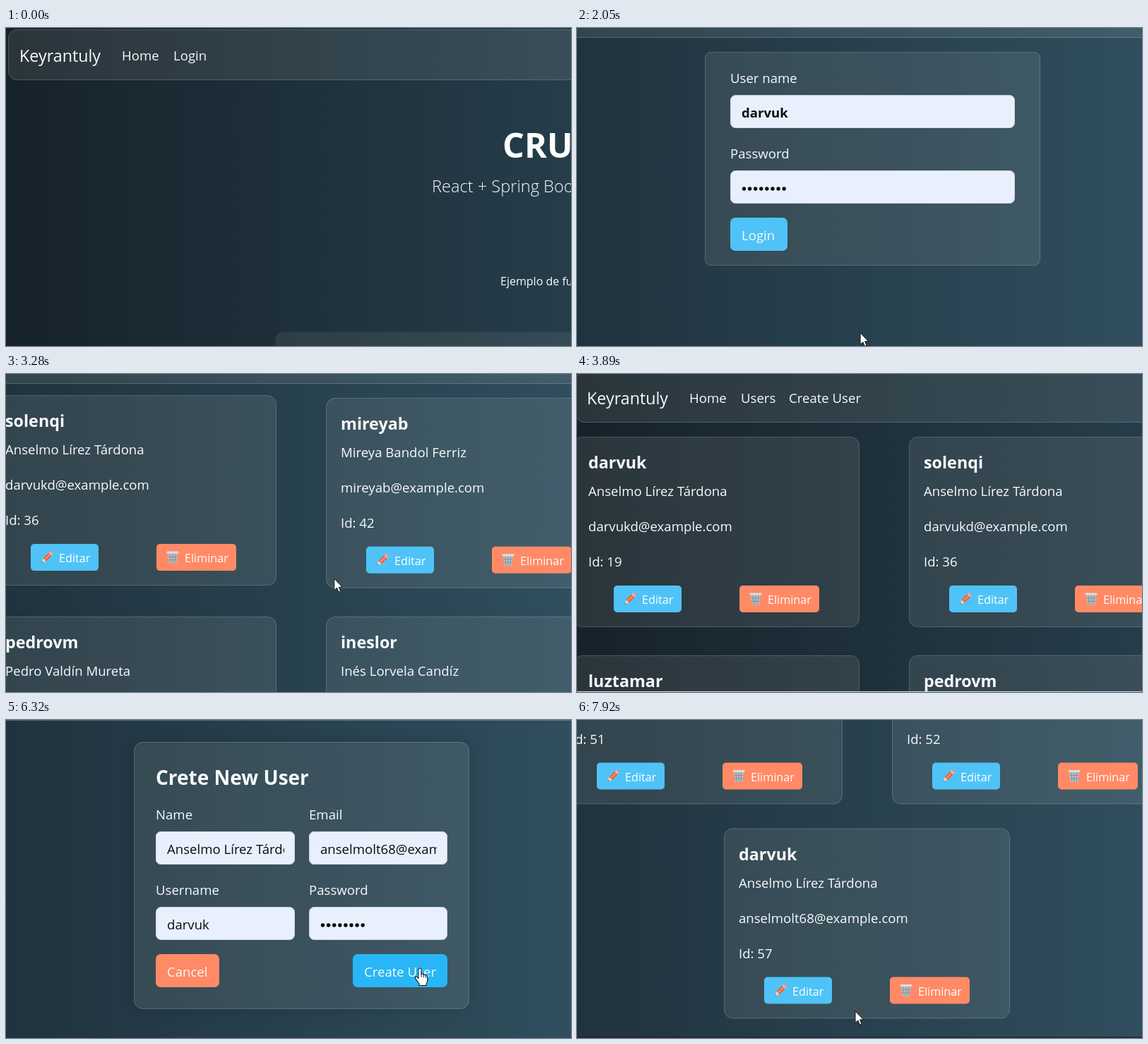
An HTML page that plays this animation: 800 by 451 pixels, repeating every 7990 ms.

```html
<!DOCTYPE html>
<html lang="es">
<head>
<meta charset="utf-8">
<title>CRUD</title>
<style>
html, body { margin: 0; width: 100%; height: 100%; overflow: hidden; background: #16222a; }
svg { display: block; width: 100vw; height: 100vh; }
text { font-family: "Open Sans", "Noto Sans", sans-serif; font-size: 18.6px; font-weight: 500; fill: #f8fafb; white-space: pre; }
.glass { fill: rgba(255,248,238,.085); stroke: rgba(255,255,255,.2); }
.brand { font-size: 23.3px; }
.title { font-size: 48.5px; font-weight: 700; fill: #fff; }
.lead { font-size: 23.6px; font-weight: 350; }
.note { font-size: 16px; }
.head { font-size: 28px; font-weight: 650; }
.name { font-size: 23.3px; font-weight: 650; }
.small { font-size: 16.2px; font-weight: 450; fill: #fff; }
.dark { font-weight: 400; fill: #0c0d10; }
.bold { font-weight: 700; }
</style>
</head>
<body>
<svg id="stage" viewBox="0 0 800 451" preserveAspectRatio="none"></svg>
<script>
const LOOP = 7990, BLUE = '#4fc3f7', ORANGE = '#ff8a65', FIELD = '#e8f0fe';
const CARD_W = 405, CARD_H = 270, LIFT = 6, SCROLLBAR_SHIFT = -7;

// Each list is ordered by start time
const CAMERAS = [[0, 0, 0], [1840, 497, 60], [3890, 5, 5], [5770, 497, 73]];
const PAGES = [[0, 'home'], [1030, 'login'], [3070, 'users'], [4710, 'create'], [6590, 'users']];
// start, end, x0, y0, x1, y1 in stage pixels
const MOVES = [
  [70, 820, 707, 421, 266, 41],
  [830, 900, 266, 41, 263, 28],
  [1050, 1480, 263, 28, 730, 480],
  [1840, 2580, 440, 465, 243, 300],
  [3090, 3300, 243, 300, 470, 290],
  [3300, 3680, 470, 290, 815, 400],
  [3930, 4560, 815, 330, 352, 28],
  [4740, 5100, 352, 28, 815, 190],
  [5770, 6250, 690, 465, 586, 352],
  [6620, 7200, 586, 352, 394, 413]
];
// Clickable areas in page pixels
const LINKS = {
  home: [237, 22, 50, 36],
  login: [714, 329, 81, 47],
  users: [305, 22, 103, 36],
  create: [988, 405, 134, 47]
};

const ME = 'Anselmo Lírez Tárdona', MAIL = 'darvukd@example.com';
const USERS = [
  ['darvuk', ME, MAIL, 19],
  ['solenqi', ME, MAIL, 36],
  ['mireyab', 'Mireya Bandol Ferriz', 'mireyab@example.com', 42],
  ['tomasgr', 'Tomás Gradel Rumea', 'tomasgr@example.com', 47],
  ['luztamar', 'Luz Tamarel Ondiz', 'luztamar@example.com', 50],
  ['pedrovm', 'Pedro Valdín Mureta', 'pedrovm@example.com', 51],
  ['ineslor', 'Inés Lorvela Candíz', 'ineslor@example.com', 52],
  ['joelbat', 'Joel Batriz Umeña', 'joelbat@example.com', 53],
  ['darvuk', ME, 'anselmolt68@example.com', 57]
];

const text = (x, y, s, cls = '') => `<text x="${x}" y="${y}" class="${cls}">${s}</text>`;
const rect = (x, y, w, h, r, fill, extra = '') =>
  `<rect x="${x}" y="${y}" width="${w}" height="${h}" rx="${r}" fill="${fill}" ${extra}/>`;
const glass = (x, y, w, h, r) => rect(x + .5, y + .5, w - 1, h - 1, r, '', 'class="glass"');
const input = (x, y, w, fill = FIELD) => rect(x + .5, y + .5, w - 1, 46, 7, fill, 'stroke="#ced4da"');
const button = (x, y, w, label, fill, id = '') =>
  rect(x, y, w, 47, 7, fill, id && `id="${id}"`) + text(x + 16, y + 32, label);
const group = (id, body) => `<g id="${id}">${body}</g>`;
const dots = (x, y) => Array.from({ length: 8 }, (_, i) =>
  `<circle cx="${x + 3.5 + i * 8.1}" cy="${y}" r="2.7" class="dark"/>`).join('');

const pencil = `<g transform="translate(80 230) rotate(45)">
  ${rect(-3, -7, 6, 12, 0, '#f0603f')}${rect(-.8, -7, 1.6, 12, 0, '#ff9a72')}
  ${rect(-3, -11, 6, 3, 1.2, '#f58a94')}${rect(-3, -8.5, 6, 1.8, 0, '#c9ced4')}
  <path d="M-3 5h6L0 10.5z" fill="#f8d9b0"/><path d="M-1 8.7h2L0 10.5z" fill="#444"/></g>`;
const bin = `<g transform="translate(258 230)">
  <path d="M-7 -6H7L5.3 8.5H-5.3z" fill="#b9bec4"/>
  <path d="M-4 -5L-3 8M0 -5V8M4 -5L3 8M-6 -1H6M-5.6 3.5H5.6" stroke="#858d95" fill="none"/>
  ${rect(-8.5, -8.5, 17, 3, 1.2, '#d9dde1')}</g>`;

function userCard([nick, full, mail, id], i) {
  return group('card' + i, glass(0, 0, CARD_W, CARD_H, 12) +
    text(21, 45, nick, 'name') + text(21, 84, full) + text(21, 134, mail) + text(21, 184, 'Id: ' + id) +
    rect(57, 211, 96, 38, 5, BLUE) + pencil + text(97, 237, 'Editar', 'small') +
    rect(235, 211, 113, 38, 5, ORANGE) + bin + text(275, 237, 'Eliminar', 'small'));
}

const homePage = text(703, 184, 'CRUD', 'title') + text(603, 233, 'React + Spring Boot', 'lead') +
  text(700, 365, 'Ejemplo de funcionamiento', 'note') +
  rect(381, 431, 1069, 300, 12, 'rgba(255,248,238,.07)');

const loginPage = glass(678, 94, 475, 303, 8) +
  text(714, 138, 'User name') + input(714, 155, 403) + text(730, 187, 'darvuk', 'dark bold') +
  text(714, 245, 'Password') + input(714, 262, 403) + dots(730, 288) +
  button(714, 329, 81, 'Login', BLUE, 'loginBtn');

const createPage = rect(678, 104, 475, 379, 12, 'rgba(0,0,0,.16)', 'filter="url(#soft)" mask="url(#outside)"') +
  glass(678, 104, 475, 379, 12) + text(709, 165, 'Crete New User', 'head') +
  text(709, 214, 'Name') + input(709, 231, 197, '#fff') +
  text(926, 214, 'Email') + input(926, 231, 196, '#fff') +
  text(709, 321, 'Username') + input(709, 338, 197) + text(725, 370, 'darvuk', 'dark') +
  text(926, 321, 'Password') + input(926, 338, 196) + dots(942, 364) +
  group('filled', input(709, 231, 197) + input(926, 231, 196) +
    `<g clip-path="url(#clipName)">${text(725, 263, ME, 'dark')}</g>` +
    `<g clip-path="url(#clipMail)">${text(942, 263, 'anselmolt68@example.com', 'dark')}</g>`) +
  button(709, 405, 90, 'Cancel', ORANGE) + button(988, 405, 134, 'Create User', BLUE, 'createBtn');

const stage = document.getElementById('stage');
stage.innerHTML = `<defs>
  <linearGradient id="bg" gradientUnits="userSpaceOnUse" x1="0" y1="0" x2="1831" y2="0">
    <stop offset="0" stop-color="#16222a"/><stop offset="1" stop-color="#3a6073"/></linearGradient>
  <filter id="soft" x="-10%" y="-10%" width="120%" height="120%"><feGaussianBlur stdDeviation="8"/></filter>
  <mask id="outside" maskUnits="userSpaceOnUse" x="600" y="0" width="640" height="600">
    ${rect(600, 0, 640, 600, 0, '#fff')}${rect(678, 104, 475, 379, 12, '#000')}</mask>
  <clipPath id="clipName">${rect(725, 231, 166, 47, 0, '#000')}</clipPath>
  <clipPath id="clipMail">${rect(942, 231, 165, 47, 0, '#000')}</clipPath>
  </defs>` +
  group('world', rect(0, 0, 1831, 1200, 0, 'url(#bg)') +
    group('scroller', glass(3, 2, 1825, 72, 12) + text(19, 48, 'Keyrantuly', 'brand') + text(164, 46, 'Home') +
      group('guest', text(237, 46, 'Login')) +
      group('member', text(237, 46, 'Users') + text(305, 46, 'Create User')) +
      group('home', homePage) + group('login', loginPage) +
      group('users', USERS.map(userCard).join('')) + group('create', createPage))) +
  rect(0, 450, 800, 1, 0, '#d5dae0', 'id="lightEdge"') +
  rect(0, 449.5, 800, 1.5, 0, '#262230', 'id="darkEdge"') +
  group('arrow', '<path d="M0 0V16.5L3.8 13L6.4 19L9 17.9L6.5 12H11.5z" fill="#fff" stroke="#111" stroke-width="1"/>') +
  group('hand', `<path d="M-2 2Q-2 0 0 0T2 2V9Q2 7.6 3.7 7.8T5.2 9.8Q5.6 8.6 7 9T8.2 11Q9 10.2 10 10.9T10.8 13
    V17Q10.8 20 9 22V24.5H-1V22Q-3 19.5-5.6 15.5Q-7.2 13.2-6 12.3T-3.4 13L-2 14.6z"
    fill="#fff" stroke="#111" stroke-width="1.1" stroke-linejoin="round"/>
    <path d="M2 9V13M5.2 10V13.5M8.2 11.5V14" stroke="#111" stroke-width=".9"/>`);

const el = {};
stage.querySelectorAll('[id]').forEach(n => el[n.id] = n);

const clamp = v => Math.max(0, Math.min(1, v));
const ease = v => v * v * (3 - 2 * v);
const lastAt = (list, t) => list.filter(e => e[0] <= t).pop();
const pageAt = t => lastAt(PAGES, t)[1];
const scrollAt = t => 481.5 * ease(clamp((t - 7370) / 430));
const show = (node, on) => node.setAttribute('display', on ? 'inline' : 'none');
const move = (node, x, y) => node.setAttribute('transform', `translate(${x} ${y})`);
const inside = (p, [x, y, w, h]) => p[0] >= x && p[0] <= x + w && p[1] >= y && p[1] <= y + h;

function cursorAt(t) {
  const m = lastAt(MOVES, t);
  if (!m) return [-50, -50];
  const k = ease(clamp((t - m[0]) / (m[1] - m[0])));
  return [m[2] + (m[4] - m[2]) * k, m[3] + (m[5] - m[3]) * k];
}

function pointerOnPage(t) {
  const [x, y] = cursorAt(t), [, cx, cy] = lastAt(CAMERAS, t);
  return [x + cx, y + cy + scrollAt(t)];
}

function cardBox(i, t) {
  const shift = t >= 6590 ? SCROLLBAR_SHIFT : 0;
  const x = i === 8 ? 712 : (i % 4) * 475;
  return [x + shift, 94 + Math.floor(i / 4) * 310, CARD_W, CARD_H];
}

// Averaging recent hover states gives the lift its transition
function liftAt(i, t) {
  let sum = 0;
  for (let k = 0; k < 10; k++) {
    const s = t - k * 20;
    if (s >= 0 && pageAt(s) === 'users' && inside(pointerOnPage(s), cardBox(i, s))) sum++;
  }
  return LIFT * ease(sum / 10);
}

function draw(t) {
  const page = pageAt(t), [, cx, cy] = lastAt(CAMERAS, t);
  const member = page === 'users' || page === 'create';
  const late = t >= 6590;
  move(el.world, -cx, -cy);
  move(el.scroller, 0, -scrollAt(t));
  ['home', 'login', 'users', 'create'].forEach(p => show(el[p], p === page));
  show(el.guest, !member);
  show(el.member, member);
  show(el.filled, t >= 5770);
  show(el.lightEdge, cx === 5);
  show(el.darkEdge, late);

  if (page === 'users') USERS.forEach((_, i) => {
    const [x, y] = cardBox(i, t);
    show(el['card' + i], i < 8 || late);
    move(el['card' + i], x, y - liftAt(i, t));
  });

  const over = inside(pointerOnPage(t), LINKS[page]);
  const paint = (node, press) => node.setAttribute('fill', !over ? BLUE : t >= press ? '#1e88e5' : '#29b6f6');
  paint(el.loginBtn, 2860);
  paint(el.createBtn, 6450);

  const [x, y] = cursorAt(t);
  const hand = over || (page === 'login' && inside(pointerOnPage(t), LINKS.home));
  show(el.arrow, !hand);
  show(el.hand, hand);
  move(hand ? el.hand : el.arrow, x, y);
}

function tick() {
  draw(performance.now() % LOOP);
  requestAnimationFrame(tick);
}
tick();
</script>
</body>
</html>
```
